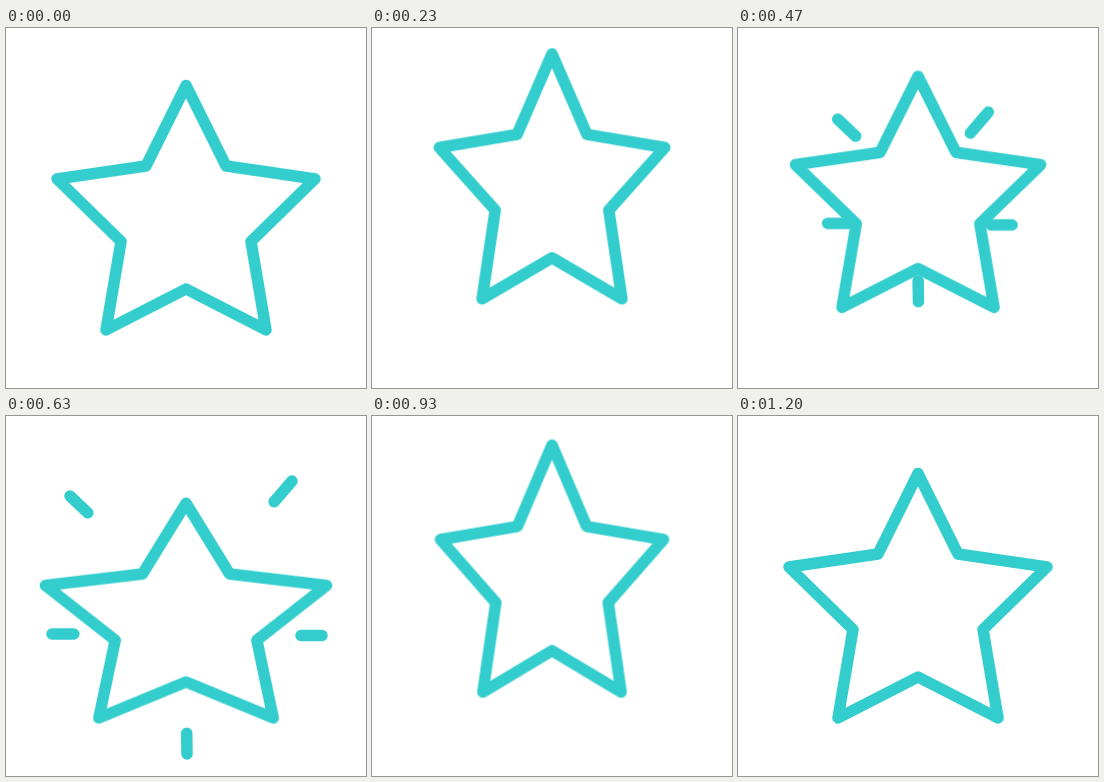
An HTML page that plays this animation: 360x360 px, repeating every 1.57 s.

```html
<!DOCTYPE html>
<html lang="en">
<head>
<meta charset="utf-8">
<title>Jumping star</title>
<style>
  html, body { margin: 0; width: 100%; height: 100%; overflow: hidden; background: #fff; }
  svg { display: block; width: 100%; height: 100%; }

  .jump {
    --ease: cubic-bezier(.333, .167, .667, .833);
    fill: none;
    stroke: #34cdce;
    stroke-width: 11.5;
    stroke-linecap: round;
    stroke-linejoin: round;
    animation: jump 1570ms var(--ease) infinite;
  }
  .star {
    vector-effect: non-scaling-stroke;
    transform-origin: 180px 302px;
    animation: squash 1570ms var(--ease) infinite;
  }
  /* A dash of fixed length slides along each ray. */
  .rays line {
    stroke-dasharray: 10 99;
    stroke-dashoffset: 10.5;
    animation: burst 1570ms linear infinite;
  }

  @keyframes jump {
    0%, 76.43%, 100% { transform: translateY(0); }
    21.02% { transform: translateY(-42px); }
    40.13% { transform: translateY(0); }
    59.24% { transform: translateY(-26px); }
  }
  @keyframes squash {
    0%, 76.43%, 100% { transform: scale(1, 1); }
    21.02% { transform: scale(.83, 1.003); }
    40.13% { transform: scale(1.09, .878); }
    59.24% { transform: scale(.864, 1.01); }
  }
  @keyframes burst {
    0%, 23.7% { stroke-dashoffset: 10.5; }
    29.94% { stroke-dashoffset: -5; }
    33.76% { stroke-dashoffset: -15.6; }
    40.13% { stroke-dashoffset: -25; }
    47.77%, 100% { stroke-dashoffset: -35.5; }
  }
</style>
</head>
<body>
<svg viewBox="0 0 360 360">
  <g class="jump">
    <g class="rays">
      <line pathLength="35" x1="127" y1="139.5" x2="64" y2="80"/>
      <line pathLength="35" x1="223" y1="138.5" x2="286" y2="65"/>
      <line pathLength="35" x1="123" y1="218" x2="46" y2="218"/>
      <line pathLength="35" x1="242" y1="219.5" x2="316" y2="219.5"/>
      <line pathLength="35" x1="180" y1="264.5" x2="181" y2="338"/>
    </g>
    <path class="star" d="M180 57.5L220 138L309 151L245 213.5L260 302L180 261L100 302L115 213.5L51 151L140 138Z"/>
  </g>
</svg>
</body>
</html>
```
